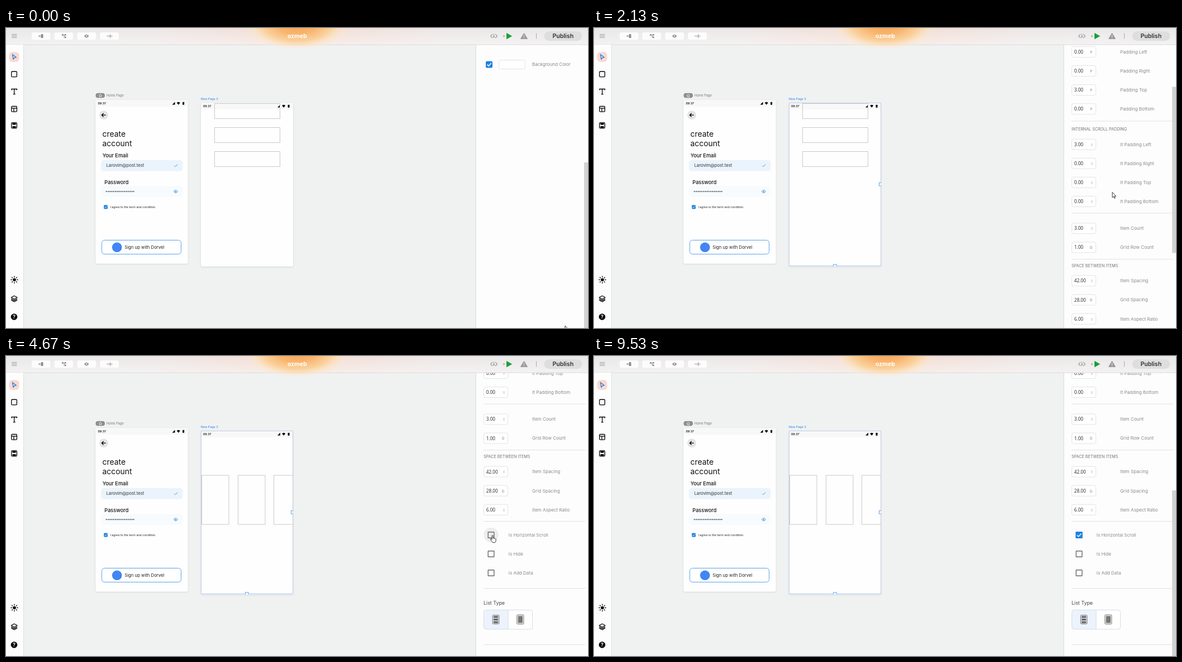
An HTML page for the animation above (9.6 s loop, 1042 by 538 pixels).

```html
<!DOCTYPE html>
<html lang="en">
<head>
<meta charset="utf-8">
<title>App builder</title>
<style>
html, body { margin: 0; width: 100%; height: 100%; overflow: hidden; background: #f0f2f2; }
svg { display: block; width: 1042px; height: 538px; }
text { font-family: Inter, sans-serif; white-space: pre; }
.noto { font-family: "Noto Sans", sans-serif; }
.line { fill: none; stroke: #000; stroke-width: 1.3; }
.gray { fill: none; stroke: #9a9a9a; stroke-width: 1.1; }
</style>
</head>
<body>
<svg id="stage" viewBox="0 0 1042 538" xmlns="http://www.w3.org/2000/svg"></svg>
<script>
const LOOP = 9600;
const MAX_SCROLL = 421;

const text = (x, y, size, fill, str, extra = '') =>
  `<text x="${x}" y="${y}" font-size="${size}" fill="${fill}" ${extra}>${str}</text>`;
const rect = (x, y, w, h, extra = '') =>
  `<rect x="${x}" y="${y}" width="${w}" height="${h}" ${extra}/>`;
const path = (d, extra = '') => `<path d="${d}" ${extra}/>`;
const circle = (x, y, r, extra = '') => `<circle cx="${x}" cy="${y}" r="${r}" ${extra}/>`;
const group = (id, body, extra = '') => `<g id="${id}" ${extra}>${body}</g>`;

const defs = `<defs>
  <linearGradient id="bar">
    <stop offset="0" stop-color="#e9e8e8"/><stop offset=".25" stop-color="#ece7e7"/>
    <stop offset=".4" stop-color="#f1e0da"/><stop offset=".5" stop-color="#f5dccb"/>
    <stop offset=".6" stop-color="#f1e0da"/><stop offset=".75" stop-color="#ece7e7"/>
    <stop offset="1" stop-color="#e9e8e8"/>
  </linearGradient>
  <linearGradient id="haze" x2="0" y2="1">
    <stop offset="0" stop-color="#fff" stop-opacity="0"/><stop offset="1" stop-color="#fff" stop-opacity=".45"/>
  </linearGradient>
  <radialGradient id="glow">
    <stop offset="0" stop-color="#f6a65a"/><stop offset=".35" stop-color="#f8b56e"/>
    <stop offset=".65" stop-color="#fbcf96" stop-opacity=".9"/>
    <stop offset=".85" stop-color="#fce3c0" stop-opacity=".5"/><stop offset="1" stop-color="#fbe9d6" stop-opacity="0"/>
  </radialGradient>
  <filter id="soft" x="-10%" y="-10%" width="120%" height="120%">
    <feDropShadow dx="0" dy="1" stdDeviation="1.6" flood-opacity=".13"/>
  </filter>
  <clipPath id="panelClip">${rect(842, 30, 200, 508)}</clipPath>
  <clipPath id="pageClip">${rect(349, 134, 165, 293.5)}</clipPath>
  <clipPath id="fieldClip">${rect(856, 0, 27.5, 1000)}</clipPath>
</defs>`;

function topBar() {
  const tabs = [46, 86.5, 127.5, 168.5].map(x => rect(x, 8, 33.5, 13, 'rx="3" fill="#fdfcfc"')).join('');
  return rect(0, 0, 1042, 30, 'fill="url(#bar)"') + rect(0, 0, 1042, 30, 'fill="url(#haze)"') +
    rect(0, 29.5, 1042, 1, 'fill="#dedbda"') +
    '<ellipse cx="521" cy="-4" rx="92" ry="43" fill="url(#glow)"/>' + tabs +
    path('M10 11.5h9.5M10 14.2h9.5M10 17h9.5', 'class="gray"') +
    path('M58 14.5h4M60 12.5v4', 'class="gray"') + rect(62.5, 11, 4, 7, 'rx="1" fill="#8b8b8b"') +
    path('M101 12.5h3v4h3M104 12.5h3', 'class="gray"') +
    [[100, 11], [105, 11], [105, 15.5]].map(([x, y]) => rect(x, y, 2.6, 2.6, 'fill="#8b8b8b"')).join('') +
    path('M140 14.5q4.2-5.6 8.4 0q-4.2 5.6-8.4 0z', 'fill="#8b8b8b"') + circle(144.2, 14.5, 1.3, 'fill="#fff"') +
    path('M180 14.5h10.5M186.5 11v7', 'class="gray"') +
    text(521.5, 18.3, 10.6, '#fff', 'ozmeb', 'font-weight="700" text-anchor="middle"') +
    path('M871 11l-3.5 3.5 3.5 3.5M876 11l3.5 3.5-3.5 3.5M873.5 10.5v6M871.8 15l1.7 2 1.7-2', 'class="gray"') +
    circle(891.5, 14.5, 1.6, 'fill="#aaa"') + path('M896 8.8l10.2 5.7-10.2 5.7z', 'fill="#15a03a"') +
    path('M927.5 9.3l6 10h-12z', 'fill="#9a9a9a" stroke="#9a9a9a" stroke-linejoin="round"') +
    path('M927.5 12.5v3.6M927.5 17.2v1.2', 'stroke="#eee" stroke-width="1.1"') +
    rect(949, 9.5, 1, 10, 'fill="#aaa"') +
    rect(963.5, 6, 68, 17, 'rx="8.5" fill="#dfdede"') +
    text(997.3, 18.3, 10.6, '#333', 'Publish', 'font-weight="600" text-anchor="middle"');
}

function sideBar() {
  let rays = '';
  for (let i = 0; i < 8; i++) rays += path('M15 444.8v2.6', `class="line" transform="rotate(${i * 45} 15 451.5)"`);
  return rect(0, 30, 31.5, 508, 'fill="#fdfdfd"') + rect(31, 30, 1, 508, 'fill="#e0e0e0"') +
    rect(5.5, 43, 18, 18, 'rx="6" fill="#fbd9d0"') +
    path('M11.5 47.5l7 5.2-3.4.5-2 3z', 'fill="none" stroke="#1e7fe0" stroke-width="1.3" stroke-linejoin="round"') +
    rect(9.8, 78, 9.6, 9.6, 'rx="1.4" class="line"') +
    path('M10 111.5v-2h9.5v2M14.7 109.5v9M12.8 118.7h4', 'class="line"') +
    rect(9.8, 140.5, 9.6, 9.6, 'rx="1.4" class="line"') + path('M10 143.8h9.4M14 143.8v6', 'class="line"') +
    rect(9.8, 170, 9.6, 9.6, 'rx="1.4" class="line"') + rect(11.6, 170.6, 6, 3, 'fill="#000"') + rect(11.6, 176, 6, 3, 'fill="#000"') +
    rays + circle(15, 451.5, 2.8, 'fill="#000"') +
    path('M14.7 480.3l5.4 3-5.4 3-5.4-3z', 'class="line" stroke-linejoin="round"') +
    path('M9.3 485.6l5.4 3 5.4-3M9.3 487.9l5.4 3 5.4-3', 'class="line" stroke-linejoin="round"') +
    circle(14.5, 518, 5.8, 'fill="#000"') +
    text(14.5, 521.3, 9, '#fff', '?', 'font-weight="700" text-anchor="middle"');
}

const statusBar = (x, y) =>
  rect(x, y, 165, 12, 'rx="3" fill="#f8f8f8"') +
  text(x + 4, y + 8.1, 5.1, '#111', '09:37', 'font-weight="600"') +
  path(`M${x + 137} ${y + 8.6}h5v-5z`) +
  path(`M${x + 145.2} ${y + 4.9}q3-2.4 6 0l-3 3.8z`) +
  rect(x + 155.6, y + 3.7, 3, 5, 'rx=".6"');

function homePage() {
  return rect(160.5, 116.8, 16.5, 8.4, 'rx="4" fill="#8d8d8d"') +
    path('M166.2 121l2.6-2.2 2.6 2.2M167 120.8v2.4h3.6v-2.4', 'fill="none" stroke="#fff" stroke-width=".8"') +
    text(179.8, 123, 5.65, '#777', 'Home Page') +
    rect(160.5, 129, 165, 293.5, 'rx="3" fill="#fefefe" filter="url(#soft)"') + statusBar(160.5, 129) +
    circle(175, 156.2, 8, 'fill="#e4e4e4"') +
    path('M178.6 156.2h-7M174.6 153l-3.2 3.2 3.2 3.2', 'class="line"') +
    text(172.5, 195.3, 13.9, '#111', 'create') +
    text(172.5, 212.3, 13.9, '#111', 'account') +
    text(172.7, 232.3, 9.2, '#111', 'Your Email', 'font-weight="500"') +
    rect(170, 236.8, 146.5, 20, 'rx="5" fill="#ebf4fc"') +
    text(179.5, 249.3, 7.7, '#333', 'Larovim@post.test') +
    path('M301.3 246.8l2 2 3.8-4.2', 'fill="none" stroke="#4a97e0" stroke-width="1"') +
    text(176.3, 279.9, 9.2, '#111', 'Password', 'font-weight="500"') +
    rect(170, 283.5, 146.5, 19.5, 'rx="5" fill="#f7fbfd"') +
    text(178.3, 296.4, 5.4, '#222', '*'.repeat(16), 'font-weight="700" style="font-family:\'DejaVu Sans Mono\',monospace"') +
    path('M300.2 293.2q3.6-5 7.2 0q-3.6 5-7.2 0z', 'fill="none" stroke="#4a97e0"') + circle(303.8, 293.2, 1.2, 'fill="#4a97e0"') +
    rect(175.2, 317.6, 6.8, 6.8, 'rx="1" fill="#1e82e0"') +
    path('M176.7 321l1.5 1.5 2.6-3', 'fill="none" stroke="#fff" stroke-width=".9"') +
    text(186.4, 323, 5.25, '#222', 'I agree to the term and condition.') +
    rect(171.5, 380.5, 142, 25, 'rx="5" fill="#fff" stroke="#5ba2ea"') +
    circle(198.7, 393.2, 8.8, 'fill="#4285f4"') +
    text(212.2, 395.9, 7.75, '#222', 'Sign up with Dorvel');
}

function newPage() {
  const box = (x, y, w, h) => rect(x + .5, y + .5, w, h, 'fill="none" stroke="#c9c9c9"');
  const column = [135, 178, 221].map(y => box(373, y, 117, 27)).join('');
  const row = [350, 415, 479].map(x => box(x, 213.5, 48.5, 88)).join('');
  const handle = (x, y) => rect(x, y, 5.5, 5.5, 'fill="#fff" stroke="#5ba2ea"');
  return text(348.8, 129, 5.4, '#1e82e8', 'New Page 3') +
    rect(349, 134, 165, 293.5, 'rx="3" fill="#fefefe" filter="url(#soft)"') + statusBar(349, 134) +
    `<g clip-path="url(#pageClip)">${group('column', column)}${group('row', row)}` +
    group('outline', rect(349.5, 134.5, 164, 292, 'fill="none" stroke="#c6d0ea"') +
      path('M350 426.5h163', 'stroke="#a9c9ef"')) +
    group('handles', handle(428.5, 424) + handle(510.5, 277.5)) + '</g>';
}

function settings() {
  let out = '';
  const sep = y => { out += rect(855, y - .5, 182.5, 1, 'fill="#e2e2e2"'); };
  const head = (y, s) => { out += text(855, y + 2.6, 7.15, '#707070', s); };
  const button = (y, w, s) => {
    out += rect(855.5, y - 11.5, w, 23, 'rx="3" fill="#fff" stroke="#d4d4d4"') +
      text(885.5, y + 3, 8.3, '#444', s, 'class="noto"');
  };
  const field = (y, value, unit, label) => {
    out += rect(855.5, y - 9.5, 43, 19, 'rx="3" fill="#fff" stroke="#e3e3e3"') +
      text(859.8, y + 3, 8.2, '#333', value, 'class="noto" clip-path="url(#fieldClip)"') +
      text(892.5, y + 2.9, 6.6, '#888', unit, 'text-anchor="end"') +
      text(942, y + 2.9, 8.15, '#8a8a8a', label);
  };
  const fields = (y, rows) => rows.forEach((r, i) => field(y + i * 34.1, ...r));

  button(37, 95.5, 'Undo-List');
  out += rect(872, 32.5, 6, 9, 'rx="1" fill="#888"') + path('M873 35.5h4M873 38.5h4', 'stroke="#fff" stroke-width=".8"');
  sep(60);
  button(77, 149, 'Add Pages to PageList');
  out += path('M867 77h4M869 75v4', 'class="gray"') + rect(872, 73, 4.6, 8, 'rx="1" fill="#888"');
  sep(100);
  fields(124, [['433.0', 'W', 'Width'], ['890.36', 'H', 'Height']]);
  sep(179.5);
  head(190.2, 'PADDING');
  fields(218, [['0.00', 'P', 'Padding Left'], ['0.00', 'P', 'Padding Right'],
    ['3.00', 'P', 'Padding Top'], ['0.00', 'P', 'Padding Bottom']]);
  sep(342);
  head(356.2, 'INTERNAL SCROLL PADDING');
  fields(383.8, [['3.00', 'I', 'It Padding Left'], ['0.00', 'I', 'It Padding Right'],
    ['0.00', 'I', 'It Padding Top'], ['0.00', 'I', 'It Padding Bottom']]);
  sep(507);
  fields(534.4, [['3.00', 'I', 'Item Count'], ['1.00', 'G', 'Grid Row Count']]);
  sep(589.7);
  head(601.2, 'SPACE BETWEEN ITEMS');
  fields(628.5, [['42.00', 'I', 'Item Spacing'], ['28.00', 'G', 'Grid Spacing'], ['6.00', 'I', 'Item Aspect Ratio']]);
  sep(717.6);
  out += circle(868.5, 742, 13.2, 'id="hover" fill="#ededed"');
  ['Is Horizontal Scroll', 'Is Hide', 'Is Add Data'].forEach((s, i) => {
    const y = 742 + i * 34;
    out += rect(863.2, y - 5.3, 10.6, 10.6, 'rx=".6" fill="none" stroke="#6c6c6c" stroke-width="1.4"') +
      text(899.8, y + 2.8, 8, '#8a8a8a', s);
  });
  out += group('check', rect(862.5, 736, 12, 12, 'rx="1.2" fill="#1e82e0"') +
    path('M864.8 742.2l2.6 2.6 5-5.4', 'fill="none" stroke="#fff" stroke-width="1.4"'));
  sep(837.8);
  out += text(855, 866.8, 8.9, '#444', 'List Type') +
    rect(855.5, 876.5, 87, 34.5, 'rx="4" fill="#fff"') +
    path('M899 876.5h-39.5q-4 0-4 4v26.5q0 4 4 4h39.5z', 'fill="#edf3fc"') +
    rect(855.5, 876.5, 87, 34.5, 'rx="4" fill="none" stroke="#d3ddea"') + rect(898.5, 877, 1, 34, 'fill="#d3ddea"') +
    rect(871.3, 885.8, 11.4, 15.6, 'rx="1" fill="none" stroke="#666"') +
    [887.3, 892, 896.7].map(y => rect(873, y, 8, 3.4, 'fill="#666"')).join('') +
    rect(914.8, 885.3, 12, 16.4, 'rx="1" fill="none" stroke="#666"') + rect(916.6, 887.2, 8.4, 12.6, 'fill="#777"');
  sep(938.5);
  return out;
}

function panel() {
  const color = rect(859, 59.5, 12, 12, 'rx="2" fill="#1e82e0"') +
    path('M861.5 65.6l2.5 2.5 4.8-5.2', 'fill="none" stroke="#fff" stroke-width="1.5"') +
    rect(882.5, 57.5, 47, 16, 'rx="3" fill="#fff" stroke="#e3e3e3"') +
    text(942, 68.3, 8.1, '#8a8a8a', 'Background Color');
  return rect(841, 30, 201, 508, 'fill="#fdfdfd"') + rect(840.5, 30, 1, 508, 'fill="#d4d4d4"') +
    group('color', color) + `<g clip-path="url(#panelClip)">${group('settings', settings())}</g>`;
}

const pointerStyle = 'fill="#fff" stroke="#222" stroke-width=".9" stroke-linejoin="round"';
const arrow = path('M0 0v9.6l2.2-2 1.5 3.4 1.5-.7-1.5-3.2h2.9z', pointerStyle);
const hand = path('M0 .8q0-1.2 1-1.2t1 1.2v4q1.6-.5 2 .3 1.5-.3 1.8.6 1.3-.1 1.3 1.2v2.4q0 3-2.4 3.3h-2.6q-1.6-.3-2.4-2l-2.2-3.6q-.4-1.4 1-1.1l1.5 1.3z', pointerStyle);

document.getElementById('stage').innerHTML = defs + rect(0, 0, 1042, 538, 'fill="#f0f2f2"') +
  homePage() + newPage() + panel() + topBar() + sideBar() +
  rect(1035, 9, 7, 298, 'id="thumb" fill="#d2d2d2"') + group('arrow', arrow) + group('hand', hand);

const el = {};
for (const id of ['column', 'row', 'outline', 'handles', 'color', 'settings', 'hover', 'check', 'thumb', 'arrow', 'hand'])
  el[id] = document.getElementById(id);

// Time, x, y of the pointer tip
const pointer = [
  [0, 1001, 534], [70, 996, 530], [400, 760, 440], [740, 465, 335], [880, 440, 320], [1020, 440, 320],
  [1240, 740, 300], [1510, 998, 287], [1920, 945, 293], [2130, 928, 294.5], [2270, 934, 297], [2480, 937, 297],
  [2880, 937, 297], [3090, 942, 280], [3240, 942, 280], [3700, 853, 300], [4270, 870, 322], [5500, 870, 322],
  [5770, 840, 322], [6180, 840, 322], [6600, 834, 210], [6900, 852, 334], [7150, 870, 322], [7550, 870, 322],
  [7830, 867, 336], [7960, 867, 336], [8180, 870, 322], [8700, 870, 322], [9050, 1031, 531], [9190, 1031, 536], [9530, 1031, 540]
];
const scroll = [[1780, 0], [1920, 66], [2000, 66], [2130, 174.5], [2270, 252], [2420, 252], [2550, 338], [2690, 338], [2810, MAX_SCROLL]];

function sample(keys, t) {
  const i = keys.findIndex(k => k[0] > t);
  if (i < 0) return keys[keys.length - 1].slice(1);
  if (i === 0) return keys[0].slice(1);
  const a = keys[i - 1], b = keys[i], p = (t - a[0]) / (b[0] - a[0]);
  return a.slice(1).map((v, j) => v + (b[j + 1] - v) * p);
}
const ramp = (t, start, length) => Math.min(1, Math.max(0, (t - start) / length));
const pulse = (t, on, off, length) => ramp(t, on, length) - ramp(t, off, length);
const show = (node, on) => node.setAttribute('opacity', +on);
const move = (node, x, y) => node.setAttribute('transform', `translate(${x} ${y})`);

function draw(t) {
  const selected = t >= 1020;
  const horizontal = (t >= 4480 && t < 7360) || t >= 8580;
  const [offset] = sample(scroll, t);
  const [x, y] = sample(pointer, t);
  const overBox = selected && Math.hypot(x - 868.5, y - 321) < 9;

  show(el.color, !selected);
  show(el.settings, selected);
  show(el.outline, t >= 810);
  show(el.handles, selected);
  show(el.column, !horizontal);
  show(el.row, horizontal);
  show(el.hover, pulse(t, 4200, 4780, 100) + pulse(t, 7050, 7560, 100) + pulse(t, 8080, 8750, 100));
  show(el.check, pulse(t, 4740, 7420, 140) + ramp(t, 8650, 140));
  move(el.settings, 0, -offset);

  const thumbY = selected ? offset * 232 / MAX_SCROLL : 232;
  move(el.thumb, 0, thumbY);
  show(el.thumb, !selected || t >= 9180 ? 1 : pulse(t, 1780, 3310, 140));

  move(el.arrow, x, y);
  move(el.hand, x, y);
  show(el.arrow, !overBox);
  show(el.hand, overBox);
}

const start = performance.now();
function tick() {
  draw((performance.now() - start) % LOOP);
  requestAnimationFrame(tick);
}
draw(0);
requestAnimationFrame(tick);
</script>
</body>
</html>
```
